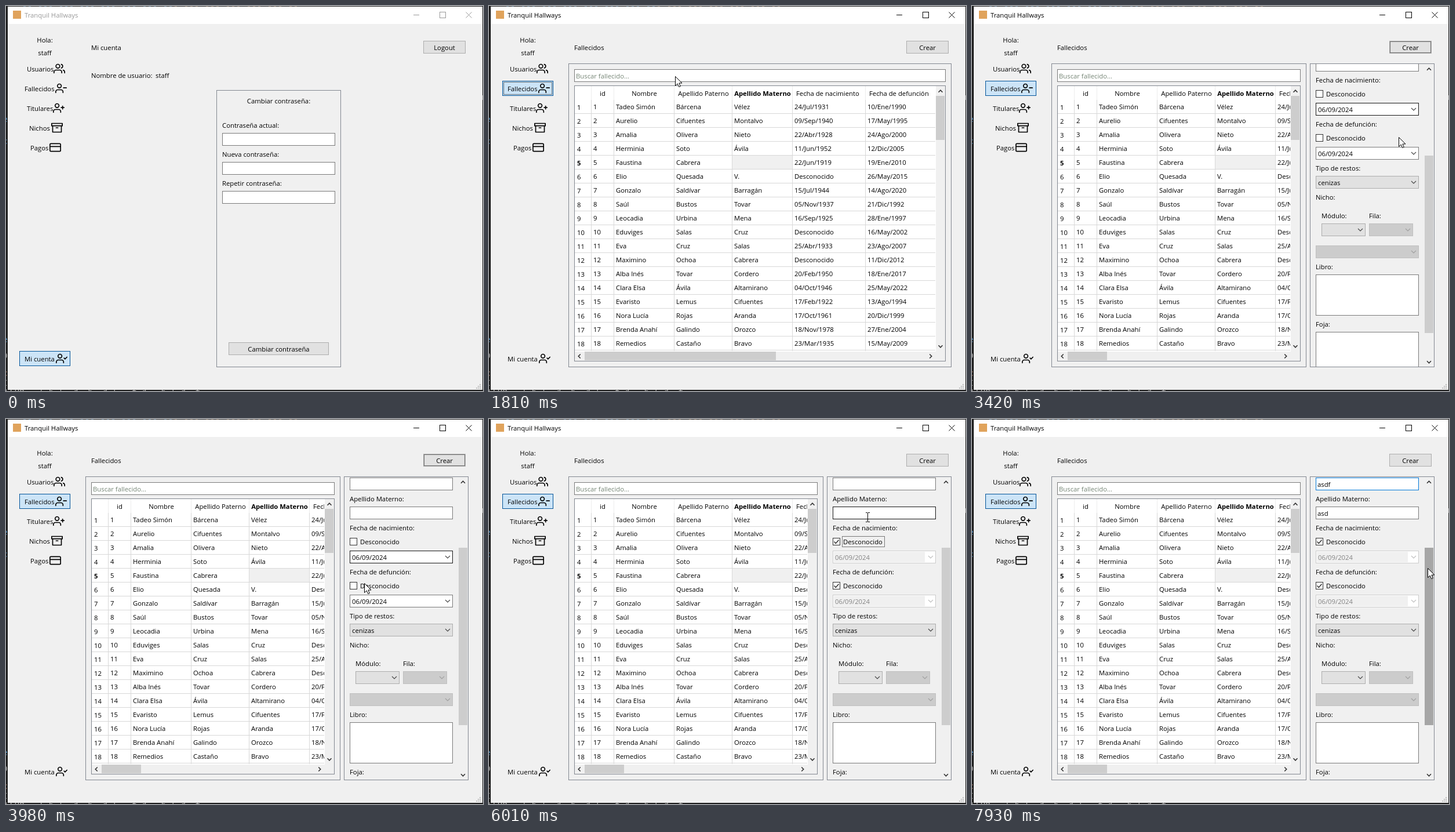
Write an HTML page with a canvas that moves like this. It is 823x664 px and loops after 8000 ms.

```html
<!DOCTYPE html>
<html lang="es">
<head>
<meta charset="utf-8">
<title>Fallecidos</title>
<style>
html, body { margin: 0; width: 100%; height: 100%; overflow: hidden; background: #1e1e1e; }
canvas { display: block; }
</style>
</head>
<body>
<canvas id="stage" width="823" height="664"></canvas>
<script>
const ctx = document.getElementById('stage').getContext('2d');
const LOOP = 8000, STEP = 70;
const UI_FONT = '11.3px "Open Sans", sans-serif';
const GREY = '#7a7a7a', FRAME = '#828790', BLUE = '#0078d7', NAVY = '#005499', FACE = '#e1e1e1';

// Screen refreshes come every STEP ms, restarting at each of these moments.
const BURSTS = [0, 910, 1390, 2220, 2580, 3420, 3700, 4540, 5380, 6210, 6900, 7030, 7860];

const EV = {
  activate: 1390, openPage: 1460, openForm: 2650, pressCreate: 2580,
  scroll: 3420, checkDeath: 4610, checkBirth: 5450,
  focusMother: 6280, typeMother: 6420, focusFather: 6840, typeFather: 7100
};
const CLICKS = [[1390, 1530], [2580, 2650], [4540, 4680], [5380, 5520], [6280, 6420], [6840, 7100]];

// time, x, y of the pointer tip
const POINTER = [
  [70, 775, 655], [280, 640, 300], [490, 380, 60], [630, 200, 26], [840, 81, 101],
  [1190, 59, 147], [1530, 59, 147], [1820, 330, 120], [2150, 693, 79], [2430, 745, 72],
  [2720, 745, 72], [3000, 720, 140], [3350, 736, 226], [3560, 736, 226], [3980, 618, 283],
  [4250, 600, 286], [4750, 600, 286], [5170, 601, 209], [5520, 601, 209], [6080, 660, 163],
  [6630, 660, 163], [6840, 660, 112], [7240, 660, 112], [7590, 800, 215], [7790, 793, 239], [7930, 786, 257]
];

const ROWS = `Tadeo Simón|Bárcena|Vélez|24/Jul/1931
Aurelio|Cifuentes|Montalvo|09/Sep/1940
Amalia|Olivera|Nieto|22/Abr/1928
Herminia|Soto|Ávila|11/Jun/1952
Faustina|Cabrera||22/Jun/1919
Elio|Quesada|V.|Desconocido
Gonzalo|Saldívar|Barragán|15/Jul/1944
Saúl|Bustos|Tovar|05/Nov/1937
Leocadia|Urbina|Mena|16/Sep/1925
Eduviges|Salas|Cruz|Desconocido
Eva|Cruz|Salas|25/Abr/1933
Maximino|Ochoa|Cabrera|Desconocido
Alba Inés|Tovar|Cordero|20/Feb/1950
Clara Elsa|Ávila|Altamirano|04/Oct/1946
Evaristo|Lemus|Cifuentes|17/Feb/1922
Nora Lucía|Rojas|Aranda|17/Oct/1961
Brenda Anahí|Galindo|Orozco|18/Nov/1978
Remedios|Castaño|Bravo|23/Mar/1935`.split('\n').map(r => r.split('|'));

const PERSON = 'M16 21v-2a4 4 0 0 0-4-4H5a4 4 0 0 0-4 4v2M12.5 7a4 4 0 1 1-8 0a4 4 0 1 1 8 0';
const ICONS = {
  users: 'M17 21v-2a4 4 0 0 0-4-4H5a4 4 0 0 0-4 4v2M13 7a4 4 0 1 1-8 0a4 4 0 1 1 8 0M23 21v-2a4 4 0 0 0-3-3.87M16 3.13a4 4 0 0 1 0 7.75',
  minus: PERSON + 'M23 11h-6',
  plus: PERSON + 'M20 8v6M23 11h-6',
  check: PERSON + 'M17 11l2 2 4-4',
  archive: 'M21 8v13H3V8M1 3h22v5H1zM10 12h4',
  card: 'M3 4h18a2 2 0 0 1 2 2v12a2 2 0 0 1-2 2H3a2 2 0 0 1-2-2V6a2 2 0 0 1 2-2zM1 10h22'
};
const MENU = [
  ['Usuarios', 36, 109, 'users', 82], ['Fallecidos', 32, 143, 'minus', 85], ['Titulares', 36, 177, 'plus', 81],
  ['Nichos', 40, 211, 'archive', 78], ['Pagos', 42, 245, 'card', 75], ['Mi cuenta', 32, 609, 'check', 86]
];

function rect(x, y, w, h, color) {
  ctx.fillStyle = color;
  ctx.fillRect(x, y, w, h);
}
function box(x, y, w, h, fill, border) {
  if (fill) rect(x, y, w, h, fill);
  ctx.strokeStyle = border;
  ctx.lineWidth = 1;
  ctx.strokeRect(x + .5, y + .5, w - 1, h - 1);
}
function dotted(x, y, w, h) {
  ctx.setLineDash([1, 1]);
  box(x, y, w, h, null, '#000');
  ctx.setLineDash([]);
}
function text(s, x, cy, { color = '#000', align = 'left', bold = false } = {}) {
  ctx.font = (bold ? 'bold ' : '') + UI_FONT;
  ctx.fillStyle = color;
  ctx.textAlign = align;
  ctx.fillText(s, x, cy + 4);
}
function line(points, color = '#000', width = 1) {
  ctx.strokeStyle = color;
  ctx.lineWidth = width;
  ctx.beginPath();
  points.forEach(p => ctx.lineTo(p[0], p[1]));
  ctx.stroke();
}
function clipped(x, y, w, h, draw) {
  ctx.save();
  ctx.beginPath();
  ctx.rect(x, y, w, h);
  ctx.clip();
  draw();
  ctx.restore();
}
function button(label, x, y, w, fill = FACE, border = '#adadad') {
  box(x, y, w, 22, fill, border);
  text(label, x + w / 2, y + 12, { align: 'center' });
}
// Chevron pointing along (dx, dy)
function chevron(x, y, dx, dy, color = '#444', size = 4, width = 1.1) {
  const h = size / 2;
  line([[x - dx * h - dy * size, y - dy * h - dx * size], [x + dx * h, y + dy * h],
    [x - dx * h + dy * size, y - dy * h + dx * size]], color, width);
}
function icon(name, x, y) {
  ctx.save();
  ctx.translate(x, y);
  ctx.scale(20 / 24, 20 / 24);
  ctx.lineCap = ctx.lineJoin = 'round';
  ctx.lineWidth = 2;
  ctx.strokeStyle = '#000';
  ctx.stroke(new Path2D(ICONS[name]));
  ctx.restore();
}

function pointerAt(t) {
  const i = POINTER.findIndex(p => p[0] > t);
  if (i < 0) return POINTER[POINTER.length - 1].slice(1);
  const a = POINTER[Math.max(0, i - 1)], b = POINTER[i];
  const k = i ? (t - a[0]) / (b[0] - a[0]) : 0;
  return [a[1] + (b[1] - a[1]) * k, a[2] + (b[2] - a[2]) * k].map(Math.round);
}
const inside = ([px, py], x, y, w, h) => px >= x && px < x + w && py >= y && py < y + h;
const typed = (word, start, t) => word.slice(0, Math.max(0, Math.floor((t - start) / STEP) + 1));

function drawDesktop() {
  rect(0, 0, 823, 664, '#1e1e1e');
  ctx.textAlign = 'left';
  ctx.font = '14px "DejaVu Sans Mono", monospace';
  [['e', 200, '#569cd6'], ['c', 238, '#569cd6'], ['e', 580, '#569cd6'], ['D', 608, '#aaa'],
    ['c', 638, '#ce9178'], ['I', 655, '#aaa']].forEach(([s, y, color]) => {
    ctx.fillStyle = color;
    ctx.fillText(s, -6, y);
  });
  ctx.fillStyle = '#b0b0b0';
  ctx.fillText('LLUQ   l b l  d  b  d l   t d   b l d  t', -2, 671);
  for (let x = 30; x < 500; x += 9) if (x % 4) rect(x, 0, 4, 1, x > 290 ? '#5a4a3c' : '#3b5266');
  rect(822, 154, 1, 8, '#888');
}

function drawWindow(t) {
  const active = t >= EV.activate, ink = active ? '#000' : '#999';
  rect(3, 1, 819, 661, '#f0f0f0');
  rect(3, 1, 819, 30, '#fff');
  rect(12, 8, 14, 14, '#e0a35c');
  text('Tranquil Hallways', 32, 16, { color: ink });
  line([[703, 15.5], [713, 15.5]], ink);
  box(748, 10, 11, 11, null, ink);
  line([[793.5, 10.5], [803.5, 20.5]], ink);
  line([[803.5, 10.5], [793.5, 20.5]], ink);
  for (let i = 0; i < 3; i++)
    for (let j = 0; j <= i; j++) rect(817 - j * 3, 652 + i * 3, 2, 2, '#bfbfbf');
}

function drawMenu(t) {
  const current = t < EV.openPage ? 'Mi cuenta' : 'Fallecidos';
  text('Hola:', 67, 59, { align: 'center' });
  text('staff', 67, 81, { align: 'center' });
  for (const [label, x, cy, name, ix] of MENU) {
    if (label === current) box(23, cy - 14, 88, 26, '#cce4f7', NAVY);
    text(label, x, cy);
    icon(name, ix, cy - 11);
  }
  if (t >= EV.activate && t < EV.pressCreate) dotted(25, 131, 84, 22);
}

function drawAccount() {
  text('Mi cuenta', 147, 72);
  button('Logout', 720, 60, 73);
  text('Nombre de usuario:', 147, 120);
  text('staff', 258, 120);
  box(363, 145, 215, 478, null, FRAME);
  text('Cambiar contraseña:', 470.5, 164, { align: 'center' });
  ['Contraseña actual:', 'Nueva contraseña:', 'Repetir contraseña:'].forEach((label, i) => {
    text(label, 373, 206 + i * 50);
    box(373, 219 + i * 50, 195, 22, '#fff', GREY);
  });
  button('Cambiar contraseña', 384, 580, 173);
}

function drawTable(right) {
  const edge = right - 10, view = edge - 18;
  box(137, 99, right - 137, 524, null, FRAME);
  box(147, 109, edge - 147, 22, '#fff', GREY);
  text('Buscar fallecido...', 150, 121, { color: '#758575' });
  box(147, 137, edge - 147, 476, '#fff', FRAME);

  clipped(148, 138, view - 148, 457, () => {
    const middle = { align: 'center' };
    text('id', 196, 151, middle);
    text('Nombre', 268, 151, middle);
    text('Apellido Paterno', 370, 151, middle);
    text('Apellido Materno', 472, 151, { align: 'center', bold: true });
    text('Fecha de nacimiento', 530, 151);
    text('Fecha de defunción', 656, 151);
    rect(420, 258, 103, 23, '#f0f0f0');
    ROWS.forEach((row, i) => {
      const cy = 174 + i * 24;
      text(i + 1, 152, cy + 1, { bold: i === 4 });
      [i + 1, ...row].forEach((s, c) => text(s, [180, 219, 323, 423, 527][c], cy));
      text(`${10 + i * 7 % 19}/${['Ene', 'May', 'Ago', 'Dic'][i % 4]}/${1990 + i * 5 % 33}`, 653, cy);
      rect(148, cy + 11, view, 1, '#d8d8d8');
    });
    for (const x of [176, 215, 319, 419, 523, 649]) {
      rect(x, 138, 1, 24, '#ececec');
      rect(x, 162, 1, 433, '#d8d8d8');
    }
  });

  rect(view + 1, 138, 16, 474, '#f0f0f0');
  rect(148, 596, view - 147, 16, '#f0f0f0');
  rect(view + 1, 155, 15, 76, '#cdcdcd');
  rect(165, 596, right > 600 ? 330 : 68, 15, '#cdcdcd');
  chevron(view + 9, 147, 0, -1, '#333', 3.5, 1.6);
  chevron(view + 9, 587, 0, 1, '#333', 3.5, 1.6);
  chevron(156, 604, -1, 0, '#333', 3.5, 1.6);
  chevron(view - 8, 604, 1, 0, '#333', 3.5, 1.6);
}

function combo(x, y, w, label, enabled = true) {
  box(x, y, w, 22, enabled ? FACE : '#cccccc', enabled ? '#adadad' : '#bfbfbf');
  text(label, x + 4, y + 12);
  chevron(x + w - 9, y + 11, 0, 1, enabled ? '#444' : '#a0a0a0');
}
function dateField(y, enabled, border) {
  box(593, y, 178, 22, '#fff', enabled ? border : '#cccccc');
  if (!enabled) rect(595, y + 2, 157, 18, '#f0f0f0');
  text('06/09/2024', 597, y + 12, { color: enabled ? '#000' : '#838383' });
  chevron(762, y + 11, 0, 1, enabled ? '#444' : '#bfbfbf');
}
function checkbox(y, checked, hover) {
  box(593, y, 13, 13, '#fff', hover ? BLUE : '#333');
  if (checked) line([[595.5, y + 6.5], [598.3, y + 9.5], [603.5, y + 3.5]], '#222', 1.3);
  text('Desconocido', 611, y + 7);
}
function textField(y, value, t, focusFrom, focusTo, lastKey, hover) {
  const focused = t >= focusFrom && t < focusTo;
  const border = focused && t >= focusFrom + 200 ? BLUE : focused || hover ? '#171717' : GREY;
  box(593, y, 178, 22, '#fff', border);
  text(value, 596, y + 12);
  const since = t - (t >= lastKey ? lastKey : focusFrom);
  if (focused && since % 1060 < 530) {
    ctx.font = UI_FONT;
    rect(Math.round(596 + ctx.measureText(value).width), y + 4, 1, 15, '#000');
  }
}

function drawForm(t, pointer) {
  const scroll = t < EV.scroll ? 120 : t < EV.scroll + STEP ? 60 : 0;
  const over = (y, w, h) => !scroll && inside(pointer, 593, y, w, h);
  const birthKnown = t < EV.checkBirth, deathKnown = t < EV.checkDeath;

  box(583, 99, 215, 524, null, FRAME);
  clipped(584, 100, 196, 522, () => {
    ctx.translate(0, -scroll);
    textField(101, typed('asdf', EV.typeFather, t), t, EV.focusFather, LOOP, EV.typeFather + 3 * STEP, over(101, 178, 22));
    text('Apellido Materno:', 593, 138);
    textField(151, typed('asd', EV.typeMother, t), t, EV.focusMother, EV.focusFather, EV.typeMother + 2 * STEP, over(151, 178, 22));
    text('Fecha de nacimiento:', 593, 188);
    checkbox(205, !birthKnown, over(205, 88, 14));
    dateField(227, birthKnown, t >= 3350 ? '#171717' : GREY);
    text('Fecha de defunción:', 593, 264);
    checkbox(281, !deathKnown, over(281, 15, 14));
    if (t >= EV.checkDeath && birthKnown) dotted(609, 278, 74, 19);
    if (t >= EV.checkBirth && t < EV.focusMother) dotted(609, 202, 74, 19);
    dateField(303, deathKnown, GREY);
    text('Tipo de restos:', 593, 340);
    combo(593, 353, 178, 'cenizas');
    text('Nicho:', 593, 390);
    text('Módulo:', 603, 422);
    text('Fila:', 685, 422);
    combo(603, 435, 76, '');
    combo(685, 435, 76, '', false);
    combo(593, 473, 178, '', false);
    text('Libro:', 593, 510);
    box(593, 523, 178, 71, '#fff', GREY);
    text('Foja:', 593, 609);
    box(593, 622, 178, 71, '#fff', GREY);
    button('Guardar', 604, 710, 74);
    button('Limpiar', 686, 710, 74);
  });

  const thumb = Math.round(222 + scroll * 71 / 120);
  rect(781, thumb, 15, 306, inside(pointer, 781, thumb, 15, 306) ? '#a6a6a6' : '#cdcdcd');
  chevron(788.5, 109, 0, -1, '#333', 3.5, 1.6);
  chevron(788.5, 614, 0, 1, '#333', 3.5, 1.6);
}

function drawDeceased(t, pointer) {
  const formOpen = t >= EV.openForm;
  const pressed = t >= EV.pressCreate && t < 2790;
  const hover = inside(pointer, 720, 60, 73, 22);
  text('Fallecidos', 147, 72);
  button('Crear', 720, 60, 73, pressed ? '#d9ebf9' : hover ? '#e5f1fb' : FACE, pressed ? NAVY : hover ? BLUE : '#adadad');
  if (t >= EV.pressCreate && t < 4540) dotted(721, 61, 71, 20);
  drawTable(formOpen ? 577 : 798);
  if (formOpen) drawForm(t, pointer);
}

function drawPointer(t, [x, y]) {
  if (CLICKS.some(([from, to]) => t >= from && t < to)) {
    ctx.fillStyle = 'rgba(255, 236, 30, .8)';
    ctx.beginPath();
    ctx.arc(x - 1, y, 11.5, 0, Math.PI * 2);
    ctx.fill();
  }
  const overText = t >= 3560 && (inside([x, y], 593, 101, 178, 22) || inside([x, y], 593, 151, 178, 22));
  if (overText) {
    rect(x, y - 7, 1, 15, '#000');
    for (const dy of [-8, 8]) {
      rect(x - 3, y + dy, 3, 1, '#000');
      rect(x + 1, y + dy, 3, 1, '#000');
    }
    return;
  }
  ctx.save();
  ctx.translate(x + .5, y + .5);
  const arrow = new Path2D('M0 0V16L3.7 12.5L6.2 18L8.8 17L6.4 11.5H11.5Z');
  ctx.fillStyle = '#fff';
  ctx.fill(arrow);
  ctx.strokeStyle = '#000';
  ctx.lineWidth = 1;
  ctx.stroke(arrow);
  ctx.restore();
}

function render(now) {
  const time = now % LOOP;
  const start = BURSTS.filter(b => b <= time).pop();
  const t = start + Math.floor((time - start) / STEP) * STEP;
  const pointer = pointerAt(t);
  drawDesktop();
  drawWindow(t);
  drawMenu(t);
  if (t < EV.openPage) drawAccount();
  else drawDeceased(t, pointer);
  if (t >= POINTER[0][0]) drawPointer(t, pointer);
}

const begin = performance.now();
(function tick() {
  render(performance.now() - begin);
  requestAnimationFrame(tick);
})();
</script>
</body>
</html>
```
